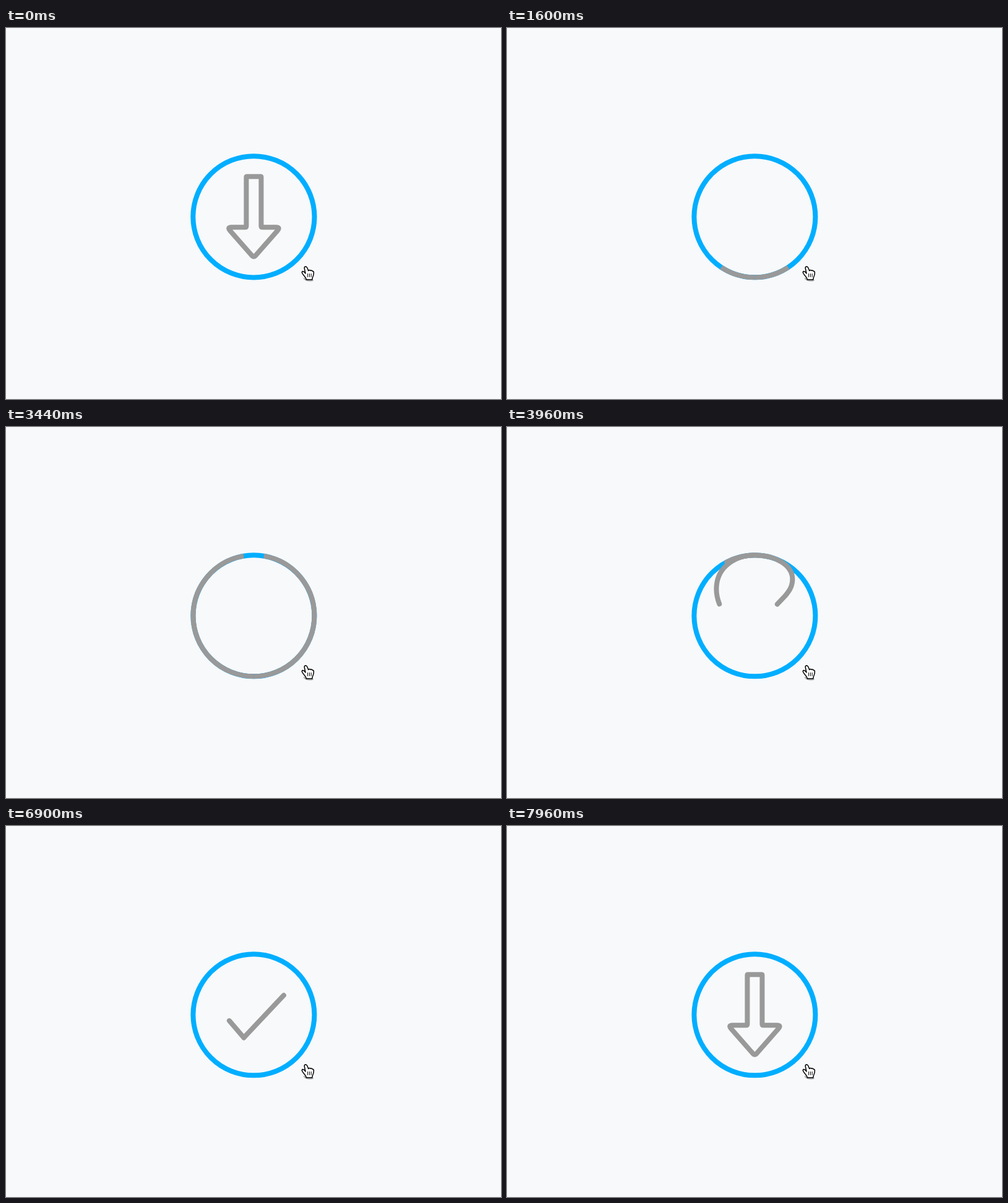
An HTML page that plays this animation: 800 by 600 pixels, repeating every 9.96 s.

```html
<!DOCTYPE html>
<html lang="en">
<head>
<meta charset="utf-8">
<title>Download button</title>
<style>
  html, body { margin: 0; width: 100%; height: 100%; overflow: hidden; background: #f7f9fb; }
  svg { display: block; width: 800px; height: 600px; }
  .line { fill: none; stroke: #999; stroke-width: 8; stroke-linejoin: round; }
</style>
</head>
<body>
<svg viewBox="0 0 800 600">
  <g id="button">
    <circle cx="400" cy="305" r="98" fill="none" stroke="#00aeff" stroke-width="8"/>
    <path class="line" id="arrow"/>
    <!-- Each strand climbs one side of the ring, crosses the top and dives into the tick. -->
    <path class="line strand" d="M400 403A98 98 0 0 0 400 207C370 207 338 225 338 262C338 280 347 299 360 314L384 342"/>
    <path class="line strand" d="M400 403A98 98 0 0 1 400 207C432 207 461 222 461 246C461 258 455 266 449 273L384 342"/>
  </g>
  <g stroke-linejoin="round" stroke-linecap="round">
    <path d="M482 405Q486 410 495.5 408" fill="none" stroke="#000" stroke-opacity=".3" stroke-width="2.5"/>
    <path d="M482.3 389Q481.8 386 484 385.8Q486 385.8 487 388.3L488.8 392.6Q490.6 390.6 492.2 392.4Q494 391.2 495 393.2Q497.2 392.8 497.4 395.6Q497.5 399 496 402Q495 404 494.8 407H485.4Q484.6 404 482.6 401.8Q479.6 398.6 478.4 395.8Q478 393.8 479.8 393.6Q481.8 393.8 484 397Z"
      fill="#fff" stroke="#000" stroke-width="1.5"/>
    <path d="M487.6 397.5V402.5M490.4 397.5V402.5M493.2 397.5V402.5" stroke="#000"/>
  </g>
</svg>
<script>
const LOOP = 9.96;
const RING = 98 * Math.PI;
const button = document.getElementById('button');
const arrow = document.getElementById('arrow');
const strokes = [Math.hypot(24, 28), Math.hypot(65, 69)];
const strands = [...document.querySelectorAll('.strand')].map((el, i) => {
  const length = el.getTotalLength();
  return { el, length, rest: length - strokes[i] };
});

const clamp = x => Math.max(0, Math.min(1, x));
const part = (t, a, b) => clamp((t - a) / (b - a));
const easeOut = x => 1 - (1 - x) ** 2;
const ease = (t, a, b) => (1 - Math.cos(Math.PI * part(t, a, b))) / 2;
const mix = (a, b, k) => a + (b - a) * k;

// Corners as x, y and how much of each edge the rounding takes.
const corners = [
  [388, 240, 1], [412, 240, 1], [412, 322, 2], [443, 322, 7],
  [400, 371, 4], [357, 322, 7], [388, 322, 2]
];

// The outline sinks into the lowest point of the ring as melt goes from 0 to 1.
function arrowPath(melt) {
  const points = corners.map(([x, y, r]) =>
    [mix(x, 400, melt), mix(y, 403, melt), mix(r, 0, melt)]);
  const toward = ([x, y, r], [u, v]) => {
    const k = r / Math.hypot(u - x, v - y);
    return `${mix(x, u, k)} ${mix(y, v, k)}`;
  };
  const n = points.length;
  return points.map((p, i) => {
    const before = toward(p, points[(i + n - 1) % n]);
    const after = toward(p, points[(i + 1) % n]);
    return `${i ? 'L' : 'M'}${before}Q${p[0]} ${p[1]} ${after}`;
  }).join('') + 'Z';
}

function draw(t) {
  const scale = 1 + 0.21 * Math.sin(Math.PI * part(t, 0, 0.6));
  button.setAttribute('transform', `translate(400.4 305.3) scale(${scale}) translate(-400 -305)`);

  const back = ease(t, 7.3, 7.7);
  const melt = ease(t, 0, 1);
  const sinking = melt < 1;
  arrow.setAttribute('d', arrowPath(sinking ? melt : 0));
  arrow.style.opacity = sinking ? 1 : back;

  const load = part(t, 1.15, 3.575);
  const swoop = easeOut(part(t, 3.575, 4.575));
  for (const { el, length, rest } of strands) {
    const tail = rest * swoop;
    const head = load < 1 ? RING * load : mix(RING, length, swoop);
    el.style.display = load > 0 ? '' : 'none';
    el.style.strokeLinecap = load < 1 ? 'butt' : 'round';
    el.style.strokeDasharray = `${head - tail} ${length * 2}`;
    el.style.strokeDashoffset = -tail;
    el.style.opacity = 1 - back;
  }
}

function tick(now) {
  draw(now / 1000 % LOOP);
  requestAnimationFrame(tick);
}
draw(0);
requestAnimationFrame(tick);
</script>
</body>
</html>
```
